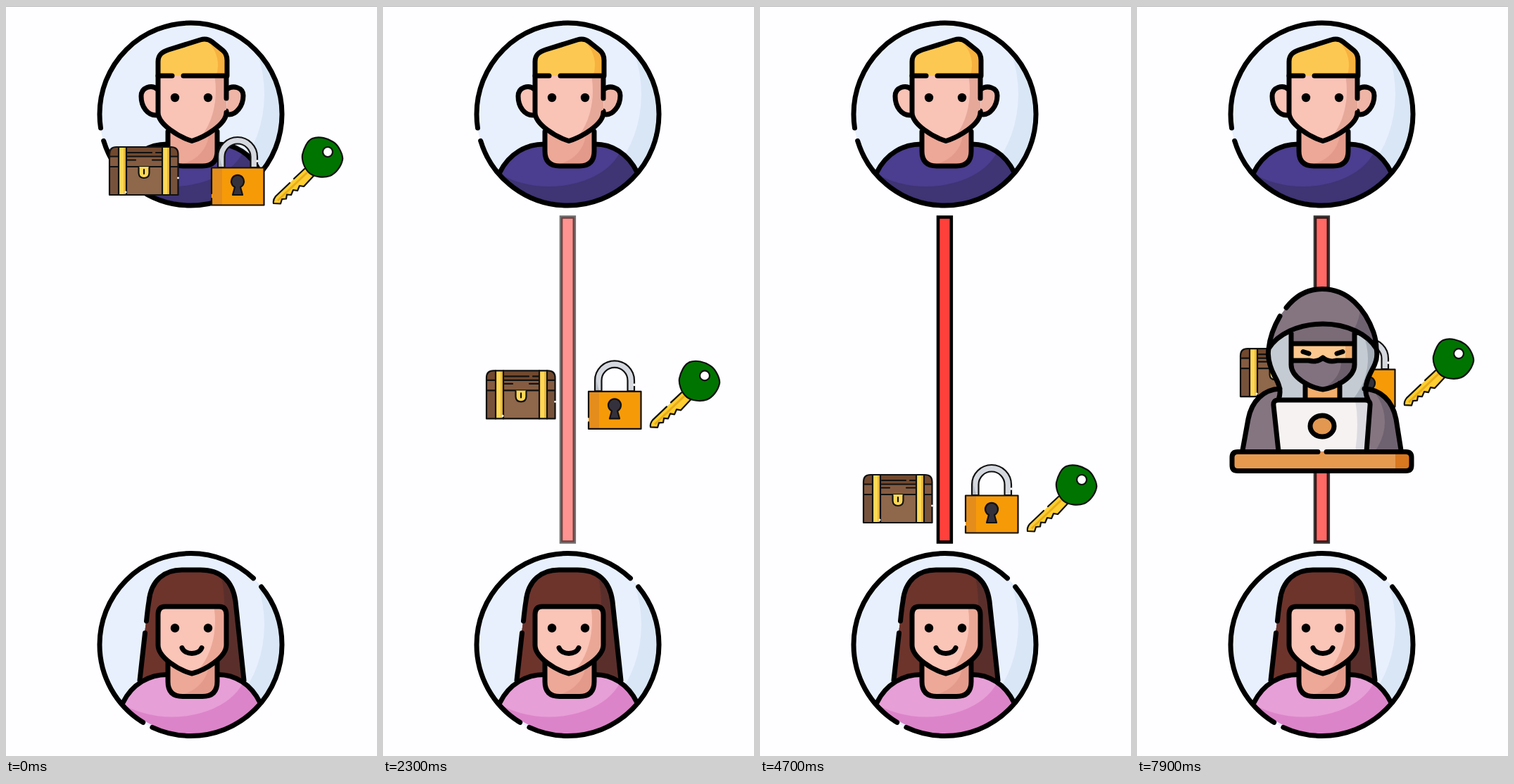
An HTML page for the animation above (8 s loop, 527 px wide and 1064 px high).

```html
<!DOCTYPE html>
<html lang="en">
<head>
<meta charset="utf-8">
<title>Key exchange</title>
<style>
  html, body { margin: 0; width: 100%; height: 100%; overflow: hidden; background: #fefdff; }
  svg { display: block; width: 527px; height: 1064px; }
  .ink { fill: none; stroke: #000; stroke-width: 7; stroke-linecap: round; stroke-linejoin: round; }
  .thin { fill: none; stroke: #111; stroke-width: 2.2; stroke-linecap: round; stroke-linejoin: round; }
  #wire { fill: #ff403b; stroke: #000; stroke-width: 4.6; fill-opacity: var(--a); stroke-opacity: var(--a); }
  #hacker > :not(clipPath) { opacity: var(--a); }
</style>
</head>
<body>
<svg id="stage" viewBox="0 0 527 1064"></svg>
<script>
const LOOP = 8000, STEP = 100;
let clipId = 0;

const fill = (d, color) => `<path d="${d}" fill="${color}"/>`;
const ink = (d, cls = 'ink') => `<path class="${cls}" d="${d}"/>`;
const dot = (x, y, r, color = '#000') => `<circle cx="${x}" cy="${y}" r="${r}" fill="${color}"/>`;
const box = (x, y, w, h, color) =>
  `<rect x="${x}" y="${y}" width="${w}" height="${h}" fill="${color}"/>`;

// A shape in its shadow colour with a lit ellipse inside it.
function lit(d, dark, light, cx, cy, rx, ry) {
  const id = 'c' + clipId++;
  return `<clipPath id="${id}"><path d="${d}"/></clipPath>` + fill(d, dark) +
    `<ellipse cx="${cx}" cy="${cy}" rx="${rx}" ry="${ry}" fill="${light}" clip-path="url(#${id})"/>`;
}

const DISC = 'M392 153.5 A129.5 129.5 0 0 1 133 153.5 A129.5 129.5 0 0 1 392 153.5 Z';
const COLLAR = 'M230 178 V206 Q230 227 251 227 H279 Q300 227 300 206 V178';
const JAW = 'V151 C216 168 246 186 264 191.5 C282 186 313 168 313 151';
const SHOULDERS = 'M166 236 C179 209 204 196 229 196 H301 C325 196 348 209 361 236';

const ring = dashes =>
  `<circle class="ink" cx="262.5" cy="153.5" r="129.5" pathLength="360" stroke-dasharray="${dashes}"/>`;

function torso(light, dark) {
  return lit(SHOULDERS + ' A129.5 129.5 0 0 1 166 236 Z', dark, light, 236, 185, 106, 71) +
    ink('M166 236 C179 209 204 196 229 196 M301 196 C325 196 348 209 361 236') +
    lit(COLLAR + ' Z', '#e39a8a', '#eda897', 236, 180, 52, 46) + ink(COLLAR);
}

const eyes = dot(240, 130, 6.2) + dot(287, 130, 6.2);
const sky = lit(DISC, '#d9e6f5', '#e8f0fe', 238, 125, 129, 150);

function man() {
  const earL = 'M215 118 C207 111 192 115 192 128 C192 143 201 155 213 155';
  const earR = 'M314 118 C322 112 337 115 337 127 C337 143 326 154 317 154 C314 154 313 152 313 149';
  const hair = 'M216 99 V79 C216 69 222 65 231 62 L276 48 C283 46 288 47 293 51 L308 63 C313 67 314 71 314 77 V99';
  return sky + torso('#4b3d8f', '#3f3474') +
    fill(earL + ' Z', '#f9c3b6') + ink(earL) +
    fill(earR + ' Z', '#efb5a6') + ink(earR) +
    lit('M216 99 ' + JAW + ' V99 Z', '#e6a899', '#f9c3b6', 238, 120, 60, 86) +
    lit(hair + ' Z', '#f7b13f', '#fdc852', 241, 84, 60, 52) +
    ink('M216 99 ' + JAW + ' M313 131 V99') +
    ink(hair + ' M216 99 H236 M252 99 H313') +
    eyes + ring('163 8.3 188.7 0');
}

function woman() {
  const hair = 'M190 204 L197 136 L203 92 C206 62 225 47.5 250 47.5 H276 C305 47.5 322 63 326 92 L338 204';
  const face = 'M216 111 Q216 99.5 226 99.5 H303 Q313 99.5 313 111 V154 ' +
    'C313 172 282 190 264 194.5 C246 190 216 172 216 154 Z';
  return sky + lit(hair + ' Z', '#5a2f2b', '#6d342c', 228, 95, 82, 120) +
    ink('M190 204 L197.5 137 M199.5 120 C201 105 202 98 203 92 C206 62 225 47.5 250 47.5 H276 ' +
        'C305 47.5 322 63 326 92 L338 204') +
    torso('#e79fd7', '#dc84c9') +
    lit(face, '#eba796', '#fac4b7', 235, 120, 62, 88) + ink(face) + eyes +
    ink('M250 158 C254 168.5 274 168.5 278 158') +
    ring('115 6.6 191.8 7.3 39.3 0');
}

function chest() {
  const shell = 'M147 268 V210 Q147 200 157 200 H234 Q244.5 200 244.5 210 V268 Z';
  const strap = x => box(x, 200, 11, 68, '#ffd955') +
    box(x + 7, 201, 4, 66, '#e9b93c') + ink(`M${x} 200 V268 M${x + 11} 200 V268`, 'thin');
  return fill(shell, '#8f674b') + box(233, 228, 11, 39, '#77523b') + box(148, 228, 12, 39, '#77523b') +
    fill('M147 227 V210 Q147 200 157 200 H234 Q244.5 200 244.5 210 V227 Z', '#71492f') +
    box(148, 214, 96, 13, '#855c41') +
    ink('M173 208 H207 M213 208 H221 M148 213.5 H244 M172 218.5 H184 M208 218.5 H221 M148 228 H244', 'thin') +
    strap(160) + strap(222) +
    fill('M188.5 228 H203.5 V237 Q203 244 196 244 Q189 244 188.5 237 Z', '#ffd955') +
    ink('M188.5 229 V237 Q189 244 196 244 Q203 244 203.5 237 V229 M196 232 V238', 'thin') +
    ink(shell, 'thin') + dot(170, 264, 1.6, '#fff') + dot(244.5, 244, 1.4, '#fff');
}

function padlock() {
  const bow = 'M301 229 V214 A28 28 0 0 1 357 214 V229 H347.5 V214 A18.5 18.5 0 0 0 310.5 214 V229 Z';
  const hole = 'M325 257 A9 9 0 1 1 333 257 L336 268 H322 Z';
  return lit(bow, '#b6bcc6', '#d5d9df', 333, 207, 30, 40) + ink(bow, 'thin') +
    box(292, 229.5, 74, 53, '#f79a08') + box(293, 230, 14, 52, '#e48d1c') +
    ink('M292 266 V229.5 H366.5 V282.5 H292 V273', 'thin') +
    fill(hole, '#35313c') + ink(hole, 'thin') + dot(357, 220, 1.8, '#fff');
}

function key() {
  const head = 'M435 188 C445 184 458 188 465 193 C473 198 479 212 478 218 C476 228 468 238 460 241 ' +
    'C452 244 438 243 431 237 C423 230 420 218 421 211 C423 202 428 191 435 188 Z';
  const teeth = 'L383 270 Q379 275 380 280 L390 280.5 L392 274 L398 273.5 L399 267.5 L405 268 ' +
    'L408 261 L414 262 L417 255 L423 256 L437 241';
  return fill('M424 231 ' + teeth + ' Z', '#ffce30') +
    '<path d="M386 276 L428 236" stroke="#e8ad1c" stroke-width="3"/>' +
    ink('M424 231 L409 245 M403 251 ' + teeth, 'thin') +
    fill(head, '#007400') + ink(head, 'thin') + dot(457, 207, 7, '#fff') +
    '<circle class="thin" cx="457" cy="207" r="7"/>';
}

// Every layer fades on its own, so the pieces are cut to overlap little.
function hacker() {
  const sleeves = 'M150 632 L158 586 C163 560 180 544 203 543 L201 558 H194 L201 632 Z ' +
    'M375 632 L368 586 C363 560 346 544 323 543 L328 558 H332 L326 632 Z';
  const sideL = 'M187 486 C185 497 188 511 196 526 C201 535 206 546 201 558';
  const sideR = 'M340 486 C342 495 340 505 335 514 C326 531 321 544 328 558';
  const lining = sideL + ' H239 V535 C226 529 219 520 219 509 V464 C205 469 194 476 187 486 Z ' +
    sideR + ' H288 V535 C301 529 309 520 309 509 V464 C322 469 333 476 340 486 Z';
  const brim = 'C328 466 299 451 264 451 C229 451 199 466 187 486';
  const dome = 'C189 467 196 452 203 440 L212 428 C226 410 244 401.5 263 401.5 ' +
    'C300 401.5 324 430 336 463 Q340 475 340 486';
  const mask = 'M219 503 H244 Q256 506 264 499 Q272 506 284 503 H309 V509 ' +
    'C309 527 283 541 264 544 C245 541 219 527 219 509 Z';
  const screen = 'M201 632 L194 567 Q193 559 201 559 H324 Q332 559 331 567 L326 632';
  return lit(sleeves, '#6f6270', '#857581', 228, 590, 124, 90) +
    lit(lining, '#a4acb7', '#c5cbd2', 236, 500, 92, 90) +
    fill('M239 535 Q264 549 288 535 V558 H239 Z', '#f2ae6c') +
    fill('M219 479 H309 V503 H219 Z', '#fdc88f') + fill('M296 479 H309 V503 H296 Z', '#eeaa6c') +
    fill('M219 479 V464 Q264 440 309 464 V479 Z', '#7a6b77') +
    lit(mask, '#6c5e6b', '#827280', 240, 505, 50, 42) +
    lit('M187 486 ' + dome + ' ' + brim + ' Z', '#6f6270', '#857581', 240, 420, 78, 80) +
    fill(screen + ' Z', '#f6f2f2') +
    fill('M310 559 H324 Q332 559 331 567 L326 632 H310 Q316 592 310 559 Z', '#dcdae1') +
    dot(263, 596, 15, '#e29850') +
    fill('M367 632.5 H143 Q135 632.5 135 640.5 V651.5 Q135 659.5 143 659.5 H367 Z', '#e69a50') +
    fill('M367 632.5 H382 Q390 632.5 390 641 V651 Q390 659.5 382 659.5 H367 Z', '#d9781f') +
    ink([
      'M150 630 L158 586 C163 560 180 544 203 543 M323 543 C346 544 363 560 368 586 L375 630',
      sideL, sideR, 'M340 486', brim, 'C189 467 196 452 203 440',
      'M212 428 C226 410 244 401.5 263 401.5 C300 401.5 324 430 336 463 Q340 475 340 486',
      'M239 535 V556 M288 535 V556', mask, 'M219 464 V503 M309 464 V503 M219 479 H309',
      'M236 490.5 L244 493 M292 490.5 L284 493', screen,
      'M246 596 A17 15 0 0 1 280 596 A17 15 0 0 1 246 596 Z',
      'M257 632.5 H143 Q135 632.5 135 640.5 V651.5 Q135 659.5 143 659.5 H382',
      'Q390 659.5 390 651.5 V640.5 Q390 632.5 382 632.5 H269'
    ].join(' '));
}

document.getElementById('stage').innerHTML =
  box(0, 0, 527, 1064, '#fefdff') + box(0, 0, 527, 1, '#b5b5b8') +
  `<g>${man()}</g><g transform="translate(0 752.5)">${woman()}</g>` +
  '<rect id="wire" x="253" y="299.5" width="18.8" height="461"/>' +
  `<g id="cargo">${chest() + padlock() + key()}</g><g id="hacker">${hacker()}</g>`;

const part = id => document.getElementById(id);
const wire = part('wire'), cargo = part('cargo'), spy = part('hacker');
const fade = (el, a) => el.style.setProperty('--a', a.toFixed(3));

// Smootherstep from 0 to 1 between two times.
function ease(t, from, to) {
  const u = Math.min(1, Math.max(0, (t - from) / (to - from)));
  return u * u * u * (10 - 15 * u + 6 * u * u);
}

function draw(t) {
  const y = 465 * ease(t, 350, 3600) - 179 * ease(t, 4780, 8030);
  const reveal = ease(t, 4780, 6650);
  cargo.setAttribute('transform', `translate(0 ${y.toFixed(2)})`);
  fade(wire, ease(t, 500, 3900) - 0.22 * reveal);
  fade(spy, reveal);
}

const start = performance.now();
function tick() {
  const t = (performance.now() - start) % LOOP;
  draw(Math.floor(t / STEP) * STEP);
  requestAnimationFrame(tick);
}
tick();
</script>
</body>
</html>
```
